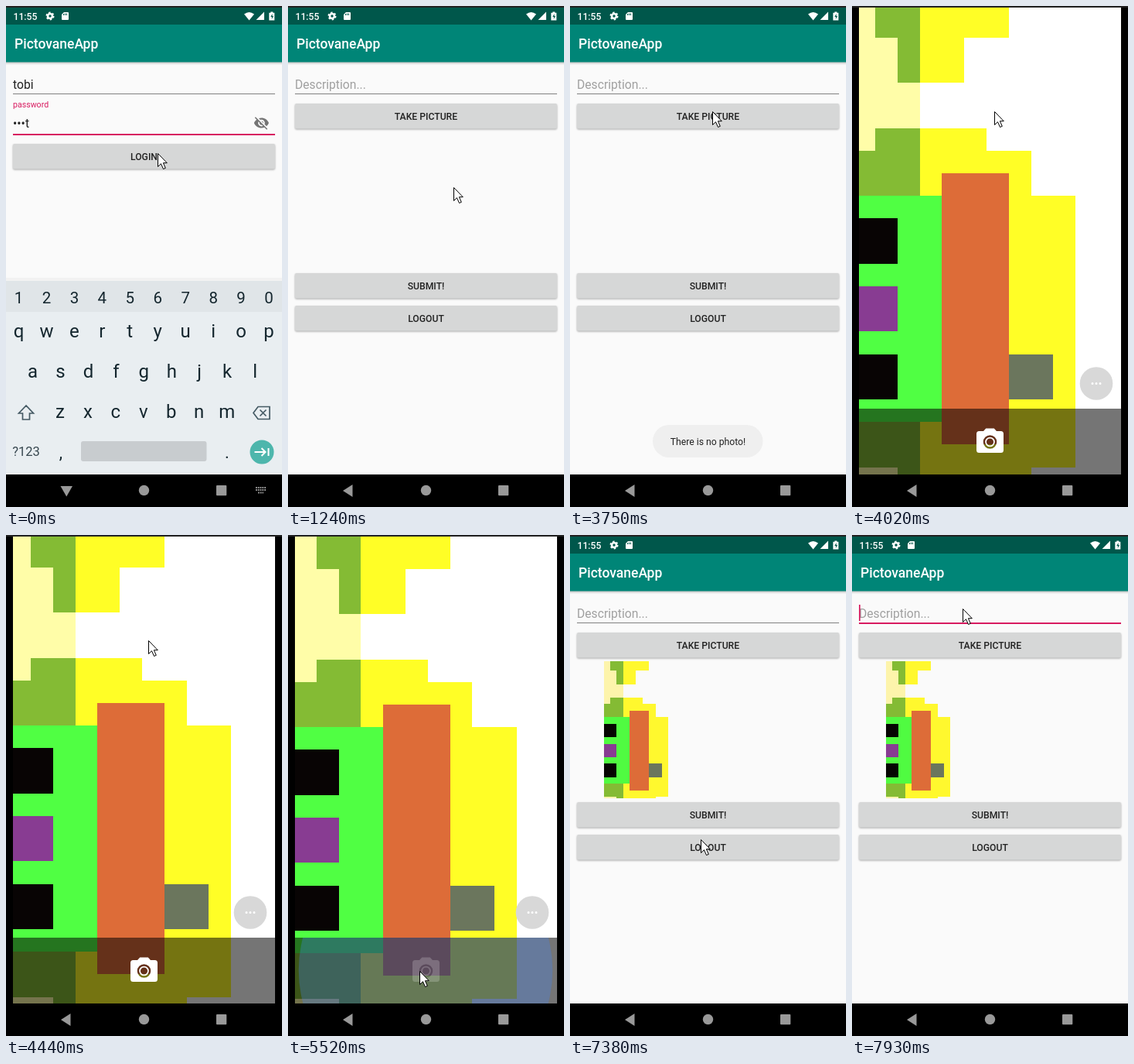
Write an HTML page that moves like this. It is 357 px wide and 647 px high and loops after 8000 ms.

```html
<!DOCTYPE html>
<html lang="en">
<head>
<meta charset="utf-8">
<title>Photo app demo</title>
<style>
  html, body { margin: 0; width: 100%; height: 100%; overflow: hidden; background: #000; }
  svg { display: block; width: 357px; height: 647px; font-family: Roboto, "Noto Sans", sans-serif; }
  .medium { font-weight: 500; }
  .mid { text-anchor: middle; }
  .line { fill: none; stroke: #455a64; stroke-width: 1.7; }
  .icon { fill: none; stroke: #fff; stroke-width: 2; }
  .btn { fill: #d6d7d7; filter: drop-shadow(0 1px 1px rgba(0, 0, 0, .32)); }
  .scene { shape-rendering: crispEdges; }
</style>
</head>
<body>
<svg viewBox="0 0 357 647">
  <defs>
    <linearGradient id="shade" x2="0" y2="1">
      <stop stop-color="#000" stop-opacity=".25"/>
      <stop offset="1" stop-color="#000" stop-opacity="0"/>
    </linearGradient>
    <clipPath id="view"><rect x="9" y="2" width="339" height="603"/></clipPath>
    <clipPath id="bar"><rect x="9" y="520" width="339" height="85"/></clipPath>
    <clipPath id="thumbClip"><rect x="44" y="163" width="269" height="177"/></clipPath>
  </defs>

  <g id="app">
    <rect width="357" height="605" fill="#fafafa"/>
    <g id="login">
      <text x="9" y="107" font-size="15.7" fill="#222">tobi</text>
      <rect x="9" y="113" width="339" height="1" fill="#808080"/>
      <text x="9" y="131" font-size="10.6" fill="#d81b60">password</text>
      <text id="secret" x="9" y="157" font-size="15.7" fill="#222"></text>
      <rect x="9" y="165" width="339" height="2" fill="#d81b60"/>
      <path transform="translate(320 140.6) scale(.87)" fill="#757575" d="M12 7c2.76 0 5 2.24 5 5 0 .65-.13 1.26-.36 1.83l2.92 2.92c1.51-1.26 2.7-2.89 3.43-4.75-1.73-4.39-6-7.5-11-7.5-1.4 0-2.74.25-3.98.7l2.16 2.16C10.74 7.13 11.35 7 12 7zM2 4.27l2.74 2.74C3.08 8.3 1.78 10.02 1 12c1.73 4.39 6 7.5 11 7.5 1.55 0 3.03-.3 4.38-.84L19.73 22 21 20.73 3.27 3zM7.53 9.8l1.55 1.55c-.05.21-.08.43-.08.65 0 1.66 1.34 3 3 3 .22 0 .44-.03.65-.08l1.55 1.55c-.67.33-1.41.53-2.2.53-2.76 0-5-2.24-5-5 0-.79.2-1.53.53-2.2zm4.31-.78l3.15 3.15.02-.16c0-1.66-1.34-3-3-3z"/>
      <g id="loginBtn"></g>
    </g>
    <g id="main">
      <rect y="72" width="357" height="533" fill="#fafafa"/>
      <text x="9" y="107" font-size="15.7" fill="#a0a0a0">Description...</text>
      <rect id="rule" x="9" y="113" width="339" height="1" fill="#808080"/>
      <rect id="caret" x="9" y="90" width="1.7" height="21" fill="#d81b60"/>
      <g id="mainBtns"></g>
      <g id="thumb" clip-path="url(#thumbClip)"></g>
      <g id="toast">
        <rect x="107" y="541" width="142.5" height="42" rx="21" fill="#efefef"/>
        <text class="mid" x="178.5" y="567" font-size="12.2" fill="#222">There is no photo!</text>
      </g>
    </g>
    <rect y="72" width="357" height="4" fill="url(#shade)"/>
    <rect y="24" width="357" height="48.5" fill="#008577"/>
    <rect y="2" width="357" height="22" fill="#00574b"/>
    <text class="medium" x="11" y="55" font-size="17.5" fill="#fff">PictovaneApp</text>
    <text class="medium" x="9.5" y="17.5" font-size="12.2" fill="#fff">11:55</text>
    <g fill="#fff">
      <circle cx="57" cy="13" r="3" fill="none" stroke="#fff" stroke-width="2.6"/>
      <circle cx="57" cy="13" r="4.6" fill="none" stroke="#fff" stroke-width="1.8" stroke-dasharray="2.4 2.417"/>
      <path d="M75 8h5q1 0 1 1v8q0 1-1 1h-7q-1 0-1-1v-6z"/>
      <path d="M74.5 10v2m2-2.500v2.500m2-2.500v2.500" stroke="#00574b"/>
      <path d="M308 10.500q6.500-5 13 0L314.500 18.500z"/>
      <path d="M334 7.500V18H323.500z"/>
      <path d="M342.300 7.500h3v1.200h2V18.500h-7V8.700h2z"/>
      <path d="M344.500 10l-2.200 4h1.500v3l2.200-4h-1.500z" fill="#00574b"/>
    </g>
    <g id="keys">
      <rect y="351" width="357" height="4" fill="#000" opacity=".03"/>
      <rect y="355" width="357" height="250" fill="#e9eef1"/>
      <rect y="355" width="357" height="40" fill="#e0e5e8"/>
      <g id="letters" class="mid" fill="#14262e"></g>
      <path class="line" d="M26 516l-9.500 10h5v8h9v-8h5zM326 517.500h15v16h-15l-6-8zM328.500 521.500l8 8m0-8l-8 8"/>
      <text class="mid" x="26" y="581" font-size="16.5" fill="#37474f">?123</text>
      <rect x="97" y="562" width="162.500" height="26" rx="3" fill="#c8cccf"/>
      <circle cx="331" cy="576" r="15.500" fill="#4db6ac"/>
      <path class="icon" d="M321.500 576h14m-5-5l5 5-5 5m9-10v10"/>
    </g>
  </g>

  <g id="camera">
    <rect width="357" height="605"/>
    <g clip-path="url(#view)">
      <g id="live"></g>
      <g id="still"></g>
    </g>
    <rect x="9" y="520" width="339" height="85" opacity=".54"/>
    <g id="capture">
      <circle cx="316" cy="487.500" r="21.300" fill="#d8d8d8"/>
      <path d="M311 487.500h.01m4.990 0h.01m4.990 0h.01" stroke="#fff" stroke-width="3" stroke-linecap="round"/>
      <g clip-path="url(#bar)"><circle id="flash" cx="178" cy="562" fill="#4285f4"/></g>
      <g id="shutter" transform="translate(157.500 542) scale(1.75)">
        <path fill="#fff" d="M9 2L7.170 4H4a2 2 0 0 0-2 2v12a2 2 0 0 0 2 2h16a2 2 0 0 0 2-2V6a2 2 0 0 0-2-2h-3.170L15 2zm3 15a5 5 0 1 1 0-10 5 5 0 0 1 0 10z"/>
        <circle cx="12" cy="12" r="3.100" fill="none" stroke="#fff" stroke-width="1"/>
      </g>
    </g>
    <g id="confirm" class="icon">
      <path d="M41.500 554l-4.500 4.500 4.500 4.500M37 558.500h10.500a5.700 5.700 0 0 1 0 11.400H38"/>
      <path d="M163.500 562.500l10 10 20-20.500" stroke-width="2.600"/>
      <path d="M305.500 554.500l15 15m0-15l-15 15" stroke-width="1.800"/>
    </g>
  </g>

  <rect width="357" height="2" fill="#222"/>
  <rect y="605" width="357" height="42"/>
  <g fill="#999">
    <path id="back" d="M71 626l12.500-8v16z"/>
    <circle cx="178.500" cy="625.500" r="6.700"/>
    <rect x="272" y="619" width="13.300" height="13.300" rx="1"/>
    <path id="kbd" d="M323 622h13m-13 3h13m-10 3.500h7" fill="none" stroke="#999" stroke-width="2" stroke-dasharray="1.800 1"/>
  </g>
  <path id="pointer" d="M.500.500V17.500L4.500 13.700 7.500 20.500 10.300 19.300 7.400 12.700H12.300z" fill="#fff" stroke="#000"/>
</svg>

<script>
const LOOP = 8000;
const $ = id => document.getElementById(id);
const add = (parent, tag, attrs, text = '') => {
  const el = document.createElementNS('http://www.w3.org/2000/svg', tag);
  for (const k in attrs) el.setAttribute(k, attrs[k]);
  el.textContent = text;
  parent.append(el);
  return el;
};
const show = (id, on) => $(id).style.display = on ? '' : 'none';

// Buttons, each with its own clipped ripple
function button(parent, label, y) {
  const box = { x: 9, y, width: 339, height: 32.5, rx: 2 };
  const clip = add(document.querySelector('defs'), 'clipPath', { id: 'clip' + y });
  add(clip, 'rect', box);
  add(parent, 'rect', { ...box, class: 'btn' });
  const layer = add(parent, 'g', { 'clip-path': `url(#clip${y})` });
  const ripple = add(layer, 'circle', { cy: y + 16, opacity: 0 });
  add(parent, 'text', { x: 178.5, y: y + 20.7, class: 'mid medium', 'font-size': 12.2, fill: '#222' }, label);
  return (t, start, x) => {
    const p = (t - start) / 420;
    const on = p > 0 && p < 1;
    ripple.setAttribute('cx', x);
    ripple.setAttribute('r', on ? 30 + 300 * p : 0);
    ripple.setAttribute('opacity', on ? 0.14 * Math.min(1, 2 - 2 * p) : 0);
  };
}
const tapLogin = button($('loginBtn'), 'LOGIN', 178);
const tapPicture = button($('mainBtns'), 'TAKE PICTURE', 126);
const tapSubmit = button($('mainBtns'), 'SUBMIT!', 345);
button($('mainBtns'), 'LOGOUT', 387);

// Keyboard rows: characters, first centre, baseline, size
[
  ['1234567890', 16.5, 383.5, 20.5],
  ['qwertyuiop', 16.5, 428, 24],
  ['asdfghjkl', 34.5, 480, 24],
  ['zxcvbnm', 70, 532, 24],
  [',', 71, 584, 22],
  ['.', 286, 584, 22]
].forEach(([chars, x, y, size]) => [...chars].forEach((c, i) =>
  add($('letters'), 'text', { x: x + i * 35.95, y, 'font-size': size }, c)));

// Blocks as [left, top, right, bottom] in grid cells
const BLOCKS = {
  pale: [[-1, -1, 3, 6], [-1, 20, 2, 22]],
  olive: [[1, -1, 3, 1], [2, 1, 3, 3], [1, 5, 3, 6], [-1, 6, 3, 8], [-1, 18, 3, 20], [2, 20, 3, 22]],
  yellow: [[3, -1, 7, 1], [3, 1, 5, 3], [3, 5, 6, 6], [3, 6, 8, 8], [3, 8, 10, 20], [3, 20, 8, 22]],
  green: [[-1, 8, 4, 18]],
  orange: [[4, 7, 7, 19]],
  black: [[-1, 9, 2, 11], [-1, 15, 2, 17]],
  purple: [[-1, 12, 2, 14]],
  gray: [[7, 15, 9, 17]]
};
const LIVE = { pale: '#fffda8', olive: '#84bb34', yellow: '#fffe26', green: '#50ff43',
  orange: '#dd6c38', black: '#080404', purple: '#883c92', gray: '#6b765d' };
const STILL = { ...LIVE, pale: '#fdf4ab', yellow: '#fff82e', green: '#50fb41', black: '#060502' };

function scene(parent, colors, back) {
  parent.classList.add('scene');
  if (back) add(parent, 'rect', { x: -2, y: -2, width: 16, height: 26, fill: back });
  for (const name in BLOCKS)
    for (const [l, top, r, b] of BLOCKS[name])
      add(parent, 'rect', { x: l, y: top, width: r - l, height: b - top, fill: colors[name] });
}
// The lower-left green meets olive, so yellow stops at the orange column
scene($('live'), LIVE, '#fff');
scene($('still'), STILL, '#fff9ff');
scene(add($('thumb'), 'g', { transform: 'translate(43.7 166.9) scale(8.35 8.57)' }), STILL);
$('still').setAttribute('transform', 'translate(5.8 15.6) scale(28.8 29.2)');

// Rows of [time, ...values], linear between rows
function track(rows, t) {
  if (t <= rows[0][0]) return rows[0].slice(1);
  for (let i = 1; i < rows.length; i++) {
    const a = rows[i - 1], b = rows[i];
    if (t < b[0]) {
      const p = (t - a[0]) / (b[0] - a[0]);
      return a.slice(1).map((v, k) => v + (b[k + 1] - v) * p);
    }
  }
  return rows[rows.length - 1].slice(1);
}
const POINTER = [
  [0, 196, 190], [1000, 196, 190], [1240, 214, 234], [1630, 232, 364], [1749, 232, 364], [1750, 235, 371],
  [2300, 235, 371], [2650, 212, 240], [2900, 187, 121], [3210, 184, 136], [4560, 184, 136], [5250, 170, 563],
  [5660, 170, 563], [6090, 180, 558], [7200, 180, 558], [7450, 165, 330], [7720, 143, 95]
];
const DRIFT = [[4000, -2, -1], [4440, 0, 0], [5250, 6, 2], [5520, 4.8, 2], [6090, 2.6, 3]];
const FLASH = [[5390, 20, 0.3], [5520, 164, 0.3], [5660, 200, 0.3], [6000, 200, 0]];

function draw(t) {
  const loggedIn = t >= 830;
  const camera = t >= 3960 && t < 7120;
  const review = t >= 6370;
  const focused = t >= 7800;

  show('app', !camera);
  show('camera', camera);
  show('main', loggedIn);
  $('main').style.opacity = track([[830, 0], [970, 1]], t)[0];
  $('secret').textContent = t < 250 ? '•••t' : '••••';
  const drop = track([[660, 0], [930, 254]], t)[0];
  $('keys').setAttribute('transform', `translate(0 ${drop})`);
  show('keys', t < 930);
  show('kbd', t < 800);
  $('back').setAttribute('d', t < 800 ? 'M70.500 620h15.500l-7.750 13.500z' : 'M71 626l12.500-8v16z');

  tapLogin(t, 115, 196);
  tapSubmit(t, 2020, 235);
  tapPicture(t, 3200, 184);
  $('toast').style.opacity = track([[2420, 0], [2580, 1], [7000, 1], [7001, 0]], t)[0];
  show('thumb', t >= 7120);
  show('caret', focused);
  $('rule').setAttribute('height', focused ? 2 : 1);
  $('rule').setAttribute('fill', focused ? '#d81b60' : '#808080');

  const [dx, dy] = track(DRIFT, t);
  $('live').setAttribute('transform', `translate(${3.2 + dx} ${12.5 + dy}) scale(28.8 29.2)`);
  show('still', review);
  show('confirm', review);
  show('capture', !review);
  const [r, alpha] = track(FLASH, t);
  $('flash').setAttribute('r', t < 5390 ? 0 : r);
  $('flash').setAttribute('opacity', alpha);
  $('shutter').setAttribute('opacity', t < 5390 ? 1 : 0.2);

  const [x, y] = track(POINTER, t).map(Math.round);
  $('pointer').setAttribute('transform', `translate(${x} ${y})`);
}

const start = performance.now();
function tick() {
  draw((performance.now() - start) % LOOP);
  requestAnimationFrame(tick);
}
tick();
</script>
</body>
</html>
```
